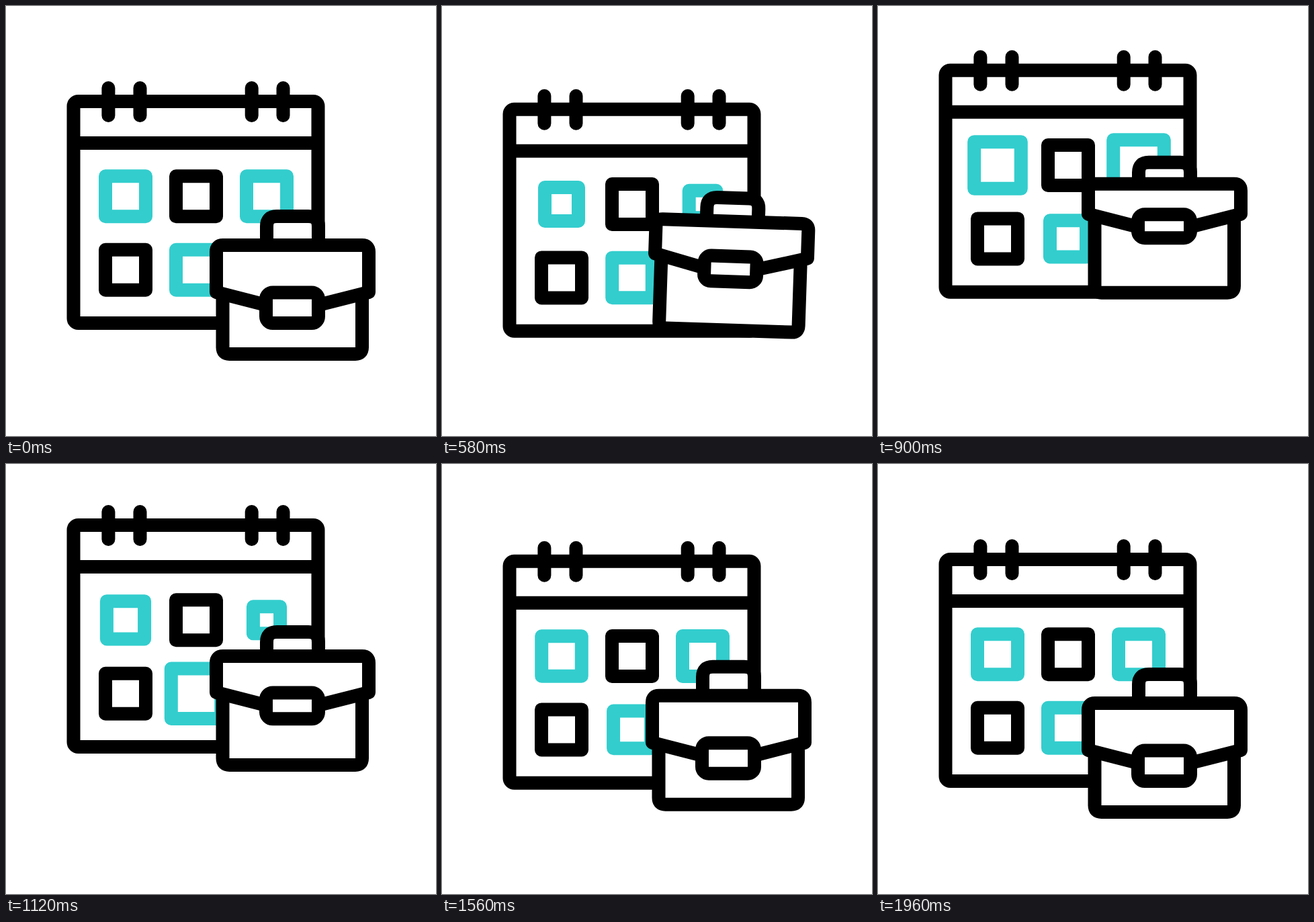
An HTML page for the animation above (2.12 s loop, 640x640 px).

```html
<!DOCTYPE html>
<html lang="en">
<head>
<meta charset="utf-8">
<title>Calendar and briefcase</title>
<style>
  html, body { margin: 0; width: 100%; height: 100%; overflow: hidden; background: #fff; }
  svg { display: block; width: 100%; height: 100%; }
</style>
</head>
<body>
<svg viewBox="0 0 640 640" fill="#fff" stroke="#000" stroke-width="20" stroke-linejoin="round">
  <g id="calendar">
    <rect x="100.5" y="142" width="364" height="330" rx="7"/>
    <path d="M100 204H465"/>
    <path stroke-linecap="round" d="M152.4 122v41M199.5 122v41M365.7 122v41M412.5 122v41"/>
    <rect x="253" y="253.3" width="60" height="60"/>
    <rect x="148" y="362.7" width="60" height="60"/>
    <g id="days" stroke="#33cdcd"><rect/><rect/><rect/></g>
  </g>
  <g id="case">
    <path id="handle" d="M388 362V328q0-15 15-15H450q15 0 15 15V362"/>
    <path id="box"/>
    <path id="flap"/>
    <rect id="lock" x="387" width="78" rx="10"/>
  </g>
</svg>
<script>
const LOOP = 2120, STEP = 20;
const $ = id => document.getElementById(id);
const set = (el, attrs) => { for (const k in attrs) el.setAttribute(k, attrs[k]); };

// Tracks are [time, value] pairs; turning points get a flat tangent.
const calendarY = [[220, 0], [470, 18], [580, 11.7], [740, -32], [900, -46.3], [1020, -53],
  [1120, -51], [1340, 22], [1370, 23.5], [1560, 2.7], [1690, -9], [1960, 0]];
const caseY = [[220, 0], [390, 17], [580, -35.5], [740, -72], [900, -91.3], [1000, -97],
  [1120, -70], [1280, 23], [1315, 29], [1340, 27.5], [1560, -11.3], [1590, -12], [1850, 2], [1960, 0]];
const caseTilt = [[400, 0], [580, 1.9], [745, 4], [900, 0]];
const flapY = [[220, 0], [390, 8], [580, -18.5], [780, -27], [900, -25], [1120, -16],
  [1340, 10.5], [1560, 0]];

// Each day shrinks, grows, shrinks and settles at its own times.
const sizes = [60, 40, 80, 40, 60];
const days = [
  { x: 178, y: 283.3, times: [460, 700, 1000, 1213, 1594] },
  { x: 388, y: 283.3, times: [330, 560, 840, 1130, 1440] },
  { x: 283, y: 392.7, times: [560, 780, 1080, 1250, 1690] }
];
for (const d of days) d.track = d.times.map((t, i) => [t, sizes[i]]);

function slope(keys, i) {
  const a = keys[i], b = keys[i + 1];
  return a && b ? (b[1] - a[1]) / (b[0] - a[0]) : 0;
}

function tangent(keys, i) {
  const p = slope(keys, i - 1), q = slope(keys, i);
  return p * q > 0 ? 2 * p * q / (p + q) : 0;
}

function at(keys, t) {
  const last = keys.length - 1;
  if (t <= keys[0][0]) return keys[0][1];
  if (t >= keys[last][0]) return keys[last][1];
  const i = keys.findIndex(k => k[0] > t) - 1;
  const [t0, v0] = keys[i], [t1, v1] = keys[i + 1];
  const d = t1 - t0, u = (t - t0) / d, w = 1 - u;
  return v0 * w * w * (1 + 2 * u) + v1 * u * u * (3 - 2 * u)
    + d * u * w * (tangent(keys, i) * w - tangent(keys, i + 1) * u);
}

function draw(t) {
  set($('calendar'), { transform: `translate(0 ${at(calendarY, t)})` });
  days.forEach((day, i) => {
    const size = at(day.track, t);
    set($('days').children[i], { x: day.x - size / 2, y: day.y - size / 2, width: size, height: size });
  });

  const s = at(flapY, t), edge = 426 + s, shrink = 0.42 * Math.min(s, 0);
  set($('case'), { transform: `translate(0 ${at(caseY, t)}) rotate(${at(caseTilt, t)} 426.5 528)` });
  set($('handle'), { transform: `translate(0 ${-0.44 * s})` });
  set($('box'), { d: `M322.5 ${edge + 2}V508q0 10 10 10H520q10 0 10-10V${edge + 2}` });
  set($('flap'), { d: `M387 ${edge + 19}L313 ${edge}V366q0-10 10-10H530q10 0 10 10V${edge}L465 ${edge + 19}z` });
  set($('lock'), { y: 426.5 + s, height: 45.5 + shrink });
}

const start = performance.now();
function frame() {
  const t = (performance.now() - start) % LOOP;
  draw(Math.floor(t / STEP) * STEP);
  requestAnimationFrame(frame);
}
frame();
</script>
</body>
</html>
```
